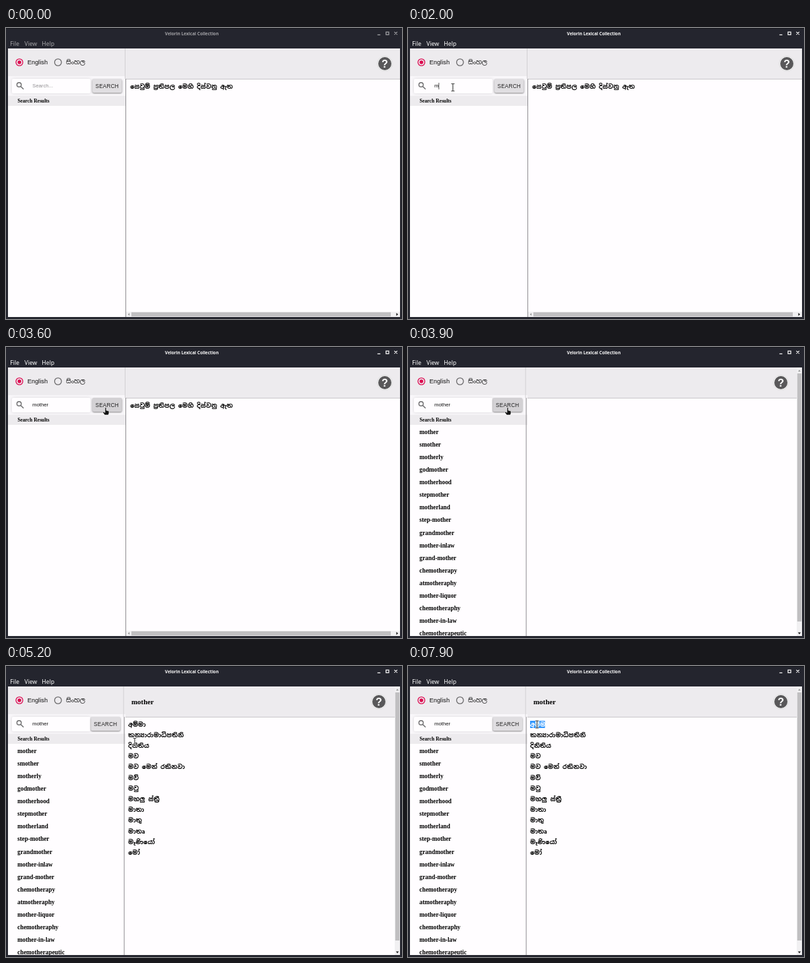
Recreate the animation shown at these times as an HTML page. Size 600 px wide and 441 px high, loop 8000 ms.

```html
<!DOCTYPE html>
<html lang="en">
<head>
<meta charset="utf-8">
<title>Dictionary search</title>
<style>
  html, body { margin: 0; width: 600px; height: 441px; overflow: hidden; background: #24252e; }
  svg { display: block; }
  text { white-space: pre; }
  .ui { font-family: "Noto Sans", "Open Sans", sans-serif; }
  .sans { font-family: "Liberation Sans", Arial, sans-serif; }
  .serif { font: bold 9.33px "Liberation Serif", serif; }
  .sinhala { font: bold 9.33px "Noto Sans Sinhala", "Noto Sans", sans-serif; }
  .button { filter: drop-shadow(0 1px 1px #0007); }
  .paper { filter: drop-shadow(0 0 2px #0002); }
</style>
</head>
<body>
<svg width="600" height="441" viewBox="0 0 600 441">
  <rect x="3" y="31" width="594" height="407" fill="#fffdff"/>
  <path d="M3 31H597V77H181V73H3Z" fill="#edebee"/>
  <path d="M181 77.5H597" stroke="#c9c7ca"/>

  <g class="sans" font-size="9.33" fill="#111">
    <circle cx="20.3" cy="52" r="5.2" fill="none" stroke="#dc0a50" stroke-width="1.3"/>
    <circle cx="20.3" cy="52" r="2.8" fill="#dc0a50"/>
    <text x="32.5" y="55">English</text>
    <circle cx="78.8" cy="52" r="5.2" fill="none" stroke="#6a696b" stroke-width="1.3"/>
    <text class="sinhala" x="91" y="55" style="font-weight:400">සිංහල</text>
  </g>

  <rect x="3" y="73" width="178" height="29" fill="#f9f7fa"/>
  <rect class="paper" x="9" y="77" width="119" height="22" rx="2" fill="#fffdff"/>
  <g fill="none" stroke="#6a696b" stroke-width="1.4">
    <circle cx="19.8" cy="86" r="3.3"/><path d="M22.3 88.5L26.6 92.8"/>
  </g>
  <text id="query" class="sans" x="40" y="90.3" font-size="7.78"></text>
  <path id="caret" d="M0 83V93" stroke="#111" stroke-width=".7"/>
  <rect x="3" y="102.5" width="178" height="15.5" fill="#edebee"/>
  <text class="serif" x="17.5" y="112.6" style="font-size:7.7px">Search Results</text>

  <g id="shift">
    <g class="button">
      <rect id="button" x="131" y="77" width="44.5" height="21" rx="2.3"/>
    </g>
    <text class="sans" x="135.5" y="90.6" font-size="8.17" letter-spacing=".233" fill="#222">SEARCH</text>
    <path d="M180.5 31V77" stroke="#d2d0d3"/>
    <path d="M181.5 77V438" stroke="#8d8c8f"/>
  </g>

  <g id="help">
    <circle cx="574" cy="54" r="11.2" fill="#fff" stroke="#bbb" stroke-width=".5"/>
    <circle cx="574" cy="54" r="10" fill="#59585a"/>
    <text class="sans" x="574" y="59.6" text-anchor="middle" font-size="16" font-weight="bold" fill="#fff">?</text>
  </g>

  <g id="idle">
    <text class="sinhala" x="188" y="91.6">සෙවුම් ප්&zwj;රතිපල මෙහි දිස්වනු ඇත</text>
    <rect x="182" y="430" width="415" height="8" fill="#f1f0f2"/>
    <rect x="190" y="430.8" width="393" height="6.4" fill="#c0bfc1"/>
    <path d="M187.2 432V436L184.6 434Z" fill="#999"/>
    <path d="M591.4 431.8V436.2L594.2 434Z" fill="#222"/>
  </g>

  <g id="results">
    <rect id="hover" x="3" width="170" height="17" rx="7" fill="#e5e3e6"/>
    <g id="words"></g>
    <rect x="589" y="31" width="8" height="407" fill="#f1f0f2"/>
    <rect x="589.8" y="40" width="6.4" height="376" fill="#c0bfc1"/>
    <path d="M591 37.2H595L593 34.6Z" fill="#999"/>
    <path d="M590.8 432.6H595.2L593 435.4Z" fill="#222"/>
  </g>

  <g id="entry">
    <text class="serif" x="190" y="57.5" style="font-size:10.9px">mother</text>
    <rect id="selection" x="185" y="83" width="22.5" height="11" fill="#3297fd"/>
    <g id="meanings"></g>
  </g>

  <path d="M0 0H600V441H0ZM3 31V438H597V31Z" fill="#24252e" fill-rule="evenodd"/>
  <path d="M0 .5H600" stroke="#15161b"/>
  <g id="chrome" class="ui" fill="#fff" stroke-width="1.2">
    <text x="281.5" y="10.6" text-anchor="middle" font-size="6.5" font-weight="bold">Velorin Lexical Collection</text>
    <g font-size="8.7">
      <text x="6.3" y="26.6">File</text><text x="28" y="26.6">View</text><text x="54.3" y="26.6">Help</text>
    </g>
    <path d="M562.8 10.3H567.2M575.8 6.2H580V10.2H575.8ZM588.4 5.8L592.8 10.2M592.8 5.8L588.4 10.2" fill="none" stroke="#fff"/>
  </g>

  <g id="cursor" stroke-linejoin="round">
    <path id="arrow" d="M0 0V11L2.6 8.6L4.3 12L6 11.2L4.4 8H8Z" fill="#111" stroke="#fff" stroke-width=".7"/>
    <g id="beam" fill="none">
      <path d="M-2.5 -5.5H2.5M0 -5.5V5.5M-2.5 5.5H2.5" stroke="#fffc" stroke-width="2.6"/>
      <path d="M-2.5 -5.5H2.5M0 -5.5V5.5M-2.5 5.5H2.5" stroke="#444" stroke-width="1.2"/>
    </g>
    <path id="hand" d="M-1 0Q0 -1.2 1 0V4L5 5V8.5L4 11H-1.5L-4 7.5Q-4.5 5.5 -3 6L-1 7.5Z" fill="#111" stroke="#fff" stroke-width=".6"/>
  </g>
</svg>
<script>
const $ = id => document.getElementById(id);
const ROW = 19.1, LIST_TOP = 118.7;

const words = ("mother smother motherly godmother motherhood stepmother motherland step-mother " +
  "grandmother mother-inlaw grand-mother chemotherapy atmotheraphy mother-liquor " +
  "chemotheraphy mother-in-law chemotherapeutic").split(" ");
const meanings = ["අම්මා", "කන්\u200dයාරාමාධිපතිනි", "දිනිතිය", "මව", "මව මෙන් රකිනවා", "මව්", "මවු",
  "මහලු ස්ත්\u200dරී", "මාතා", "මාතු", "මාතෘ", "මෑණියෝ", "මෝ"];

const column = (items, style, x, y, step) => items.map((item, i) =>
  `<text class="${style}" x="${x}" y="${y + i * step}">${item}</text>`).join("");
$("words").innerHTML = column(words, "serif", 17.3, 131.7, ROW);
$("meanings").innerHTML = column(meanings, "sinhala", 185, 91.6, 16.2);

const typedAt = [2000, 2200, 2300, 2400, 2500, 2800];
// time, x, y
const path = [[100, 330, 445], [900, 120, 92], [1300, 68, 90], [3100, 68, 90], [3500, 151, 92], [3900, 151, 92],
  [4200, 57, 122], [4400, 57, 122], [4800, 275, 190], [5200, 195, 115], [5500, 195.5, 88.5]];

const show = (id, on) => $(id).style.display = on ? "" : "none";
const clamp = v => Math.max(0, Math.min(1, v));

function pointer(t) {
  const next = path.findIndex(p => p[0] > t);
  if (next < 1) return path[next < 0 ? path.length - 1 : 0].slice(1);
  const [t0, x0, y0] = path[next - 1], [t1, x1, y1] = path[next];
  const u = (t - t0) / (t1 - t0), k = u * u * (3 - 2 * u);
  return [x0 + (x1 - x0) * k, y0 + (y1 - y0) * k];
}

function render(t) {
  const found = t >= 3800, opened = t >= 4200;
  const [x, y] = pointer(t);

  show("idle", !found);
  show("results", found);
  show("entry", opened);
  $("shift").setAttribute("transform", `translate(${found ? -2.4 : 0})`);
  $("help").setAttribute("transform", `translate(${found ? -9 : 0})`);
  $("chrome").setAttribute("opacity", 0.58 + 0.42 * clamp((t - 100) / 400));

  const typed = "mother".slice(0, typedAt.filter(at => at <= t).length);
  $("query").textContent = typed || "Search...";
  $("query").setAttribute("fill", typed ? "#111" : "#918f92");
  show("caret", t >= 1600 && t < 3100);
  const end = typed ? $("query").getComputedTextLength() : 0;
  $("caret").setAttribute("transform", `translate(${40.3 + end})`);

  const onButton = x > 130 && x < 176 && y > 77 && y < 98 && t > 3100;
  const row = Math.floor((y - LIST_TOP) / ROW);
  const onList = found && x < 173 && row >= 0;
  const onField = x < 128 && y > 77 && y < 99;
  const onMeaning = opened && x > 181 && x < 260;
  $("button").setAttribute("fill", onButton ? "#d3d1d4" : "#e0dee1");
  show("hover", onList);
  $("hover").setAttribute("y", LIST_TOP + 1 + row * ROW);

  const shape = onButton || onList ? "hand" : onField || onMeaning ? "beam" : "arrow";
  for (const id of ["hand", "beam", "arrow"]) show(id, id === shape);
  show("cursor", t >= 100);
  $("cursor").setAttribute("transform", `translate(${x} ${y})`);

  const selected = t >= 7800;
  show("selection", selected);
  $("meanings").firstChild.setAttribute("fill", selected ? "#fff" : "#000");
}

function tick(now) {
  render(Math.floor(now % 8000 / 100) * 100);
  requestAnimationFrame(tick);
}
tick(performance.now());
</script>
</body>
</html>
```
